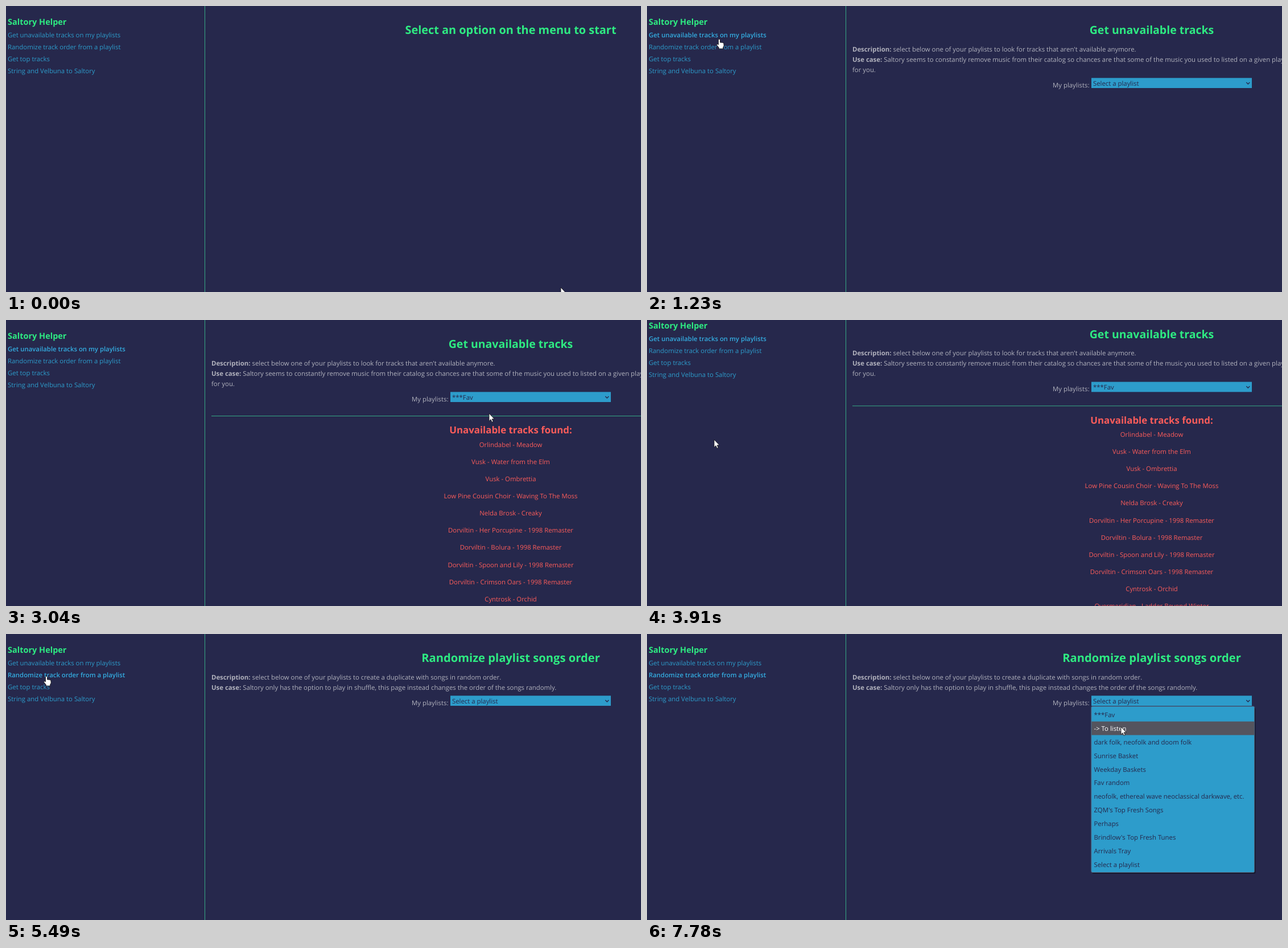
Animation of 1116 by 502 pixels, one loop 8 s. Source, as an HTML page:

```html
<!DOCTYPE html>
<html lang="en">
<head>
<meta charset="utf-8">
<title>Playlist helper</title>
<style>
  html, body { margin: 0; width: 100%; height: 100%; overflow: hidden; background: #26284c; }
  svg { display: block; width: 100%; height: 100%; }
  text { font: 11.36px "Open Sans", "Noto Sans", sans-serif; text-rendering: geometricPrecision; white-space: pre; }
</style>
</head>
<body>
<svg id="stage" viewBox="0 0 1116 502"></svg>
<script>
const LOOP = 8000, MID = 887, ROW = 23.86;
const BG = '#26284c', GREEN = '#2eeb82', BLUE = '#2d9ccb', GREY = '#b1b2bd', RED = '#fb5c5a', RULE = '#35a884';

const menu = [
  'Get unavailable tracks on my playlists', 'Randomize track order from a playlist',
  'Get top tracks', 'String and Velbuna to Saltory'
];
const playlists = [
  '***Fav', '-&gt; To listen', 'dark folk, neofolk and doom folk', 'Sunrise Basket',
  'Weekday Baskets', 'Fav random', 'neofolk, ethereal wave neoclassical darkwave, etc.',
  "ZQM's Top Fresh Songs", 'Perhaps', "Brindlow's Top Fresh Tunes", 'Arrivals Tray', 'Select a playlist'
];
const tracks = [
  'Orlindabel - Meadow', 'Vusk - Water from the Elm', 'Vusk - Ombrettia',
  'Low Pine Cousin Choir - Waving To The Moss', 'Nelda Brosk - Creaky',
  'Dorviltin - Her Porcupine - 1998 Remaster', 'Dorviltin - Bolura - 1998 Remaster',
  'Dorviltin - Spoon and Lily - 1998 Remaster', 'Dorviltin - Crimson Oars - 1998 Remaster',
  'Cyntrosk - Orchid', 'Overmeridian - Ladder Beyond Winter'
];
const pages = [
  { title: 'Select an option on the menu to start', size: 19.9 },
  {
    title: 'Get unavailable tracks', size: 19.5, boxY: 126,
    about: "select below one of your playlists to look for tracks that aren't available anymore.",
    use: 'Saltory seems to constantly remove music from their catalog so chances are that some of the music you used to listed on a given playlist',
    more: 'for you.'
  },
  {
    title: 'Randomize playlist songs order', size: 20.2, boxY: 108,
    about: 'select below one of your playlists to create a duplicate with songs in random order.',
    use: 'Saltory only has the option to play in shuffle, this page instead changes the order of the songs randomly.'
  }
];

// Moves: start, end, then where to; the value rests in between
const pointerMoves = [
  [70, 820, 127, 58], [1300, 1730, 703, 133], [1800, 2080, 850, 136], [2200, 2430, 849, 164],
  [3700, 3900, 118, 210], [4530, 5000, 71, 74], [5690, 5950, 300, 146], [5950, 6310, 866, 114],
  [6850, 7110, 850, 142], [7440, 7580, 833, 163]
];
const scrollMoves = [[3780, 4040, 35], [4530, 4900, 0]];
const clicks = [950, 2120, 2740, 5100, 6510];

function glide(from, moves, t) {
  return moves.reduce((at, [start, end, ...to]) => {
    const p = Math.min(1, Math.max(0, (t - start) / (end - start))), e = p * p * (3 - 2 * p);
    return at.map((v, i) => v + (to[i] - v) * e);
  }, from);
}

const pen = document.createElement('canvas').getContext('2d');
pen.font = '11.36px "Open Sans", "Noto Sans", sans-serif';
const widthOf = s => pen.measureText(s).width;

const text = (x, y, s, fill, style = '', anchor = 'start') =>
  `<text x="${x}" y="${y}" fill="${fill}" text-anchor="${anchor}" style="${style}">${s}</text>`;
const rect = (x, y, w, h, fill, more = '') =>
  `<rect x="${x}" y="${y}" width="${w}" height="${h}" fill="${fill}" ${more}/>`;
const bold = size => `font-size:${size}px;font-weight:700`;
const labelled = (y, label, s) =>
  text(361, y, `<tspan font-weight="700">${label}:</tspan> ${s}`, GREY);

function sidebar(page, hover) {
  return text(3, 32.5, 'Saltory Helper', GREEN, bold(14.5)) + menu.map((s, i) => {
    const y = 55 + i * 21, active = i === page - 1;
    return (i === hover && !active ? rect(2.5, y - 12, widthOf(s) + 1, 16, GREEN, 'rx="3"') : '') +
      text(3, y, s, active ? '#34ace0' : BLUE, active ? 'font-weight:600' : '');
  }).join('');
}

function content(page, value) {
  const p = pages[page], y = p.boxY;
  const title = text(MID, 49.3, p.title, GREEN, bold(p.size), 'middle');
  if (!page) return title;
  return title + labelled(80, 'Description', p.about) + labelled(98, 'Use case', p.use) +
    text(361, 116, p.more || '', GREY) + text(713, y + 17, 'My playlists:', GREY) +
    rect(781, y + .3, 282, 17.7, BLUE) + text(784, y + 14, value, BG) +
    `<path d="M1053.3 ${y + 8}l3 3 3-3" fill="none" stroke="${BG}" stroke-width="1.3"/>`;
}

function results() {
  return rect(361, 168, 755, 1, RULE) +
    text(MID, 199.3, 'Unavailable tracks found:', RED, bold(16.85), 'middle') +
    tracks.map((s, i) => text(MID, 222.8 + i * 30.1, s, RED, '', 'middle')).join('');
}

function dropdown(boxY, mouseY) {
  const top = boxY + 21.7;
  const picked = Math.max(0, Math.floor((mouseY - top) / ROW));
  return rect(782.5, top, 287, 291, '#11121f', 'rx="2" opacity=".7"') +
    rect(780.8, boxY + 19, 286.8, 291.5, BLUE, 'rx="2" stroke="#50627c"') +
    playlists.map((s, i) => {
      const y = top + i * ROW, on = i === picked;
      return (on ? rect(781.3, y, 285.8, ROW, '#54545e') : '') +
        text(785.5, y + 16.4, s, on ? '#fff' : BG);
    }).join('');
}

function cursor(x, y, hand, pressed) {
  const arrow = 'M0 0V13.4L3 10.6 5.1 15.3 7.2 14.3 5.2 9.8H9.3Z';
  const finger = 'M-1.5 1Q0-1 1.5 1V6L5.4 6.2 7.8 7.2 8.2 12 6.7 14.5V17H-.7V15L-4.4 10.5Q-4.6 8.6-2.8 8.9L-1.5 10Z';
  return (pressed ? `<circle cx="${x}" cy="${y}" r="9.3" fill="#e6e014" opacity=".65"/>` : '') +
    `<path transform="translate(${x} ${y})" d="${hand ? finger : arrow}" fill="#fff" stroke="#111" stroke-width=".8"/>`;
}

function scene(t) {
  const [x, y] = glide([975, 494], pointerMoves, t), [scroll] = glide([0], scrollMoves, t);
  const page = t < 1020 ? 0 : t < 5350 ? 1 : 2;
  const value = page === 1 && t >= 2830 ? playlists[0] : 'Select a playlist';
  const hover = menu.findIndex((s, i) =>
    x < widthOf(s) + 4 && Math.abs(y + scroll - 51 - i * 21) < 8.5);
  const open = t >= 2200 && t < 2830 || t >= 6850;
  const found = page === 1 && t >= 2970;
  return `<g transform="translate(0 ${-scroll})">` + sidebar(page, hover) + content(page, value) +
    (found ? results() : '') + '</g>' + rect(349, 0, 1, 502, RULE) +
    (open ? dropdown(pages[page].boxY, y) : '') +
    cursor(x, y, hover >= 0, clicks.some(c => t >= c && t < c + 200));
}

const stage = document.getElementById('stage');
function draw() {
  stage.innerHTML = scene(performance.now() % LOOP);
  requestAnimationFrame(draw);
}
draw();
</script>
</body>
</html>
```
